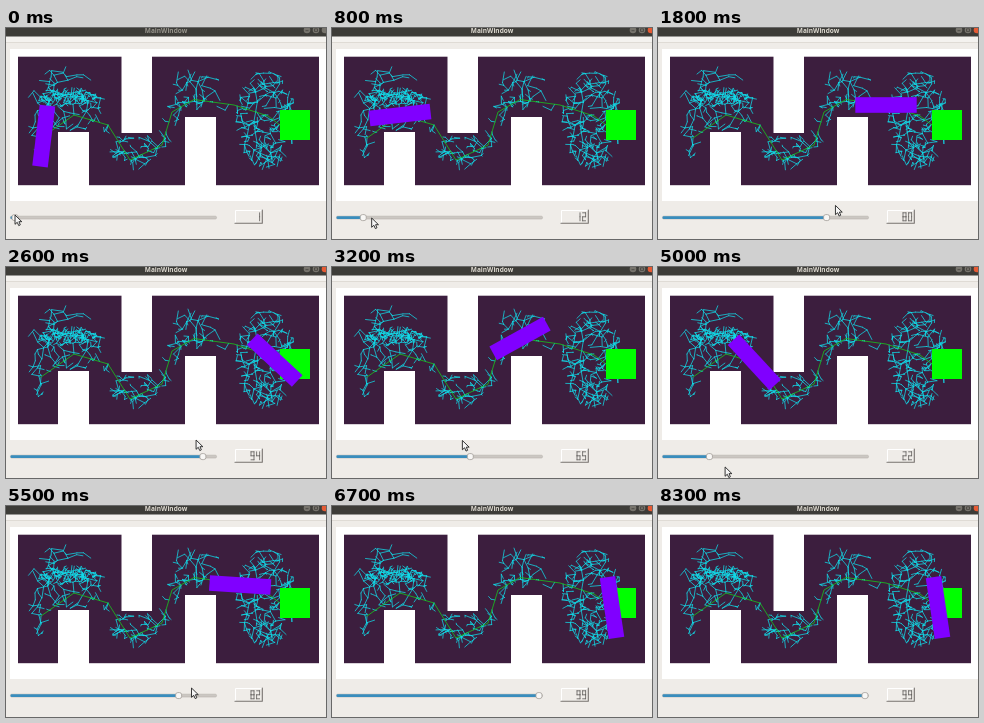
An HTML page that plays this animation: 320 px wide and 211 px high, repeating every 8.5 s.

```html
<!DOCTYPE html>
<html lang="en">
<head>
<meta charset="utf-8">
<title>MainWindow</title>
<style>
html, body { margin: 0; width: 100%; height: 100%; overflow: hidden; background: #efece8; }
svg { display: block; width: 100vw; height: 100vh; }
#title { font: bold 6.5px "Open Sans", sans-serif; text-anchor: middle; }
.line { fill: none; stroke-linecap: round; stroke-linejoin: round; }
</style>
</head>
<body>
<svg viewBox="0 0 320 211">
  <rect width="320" height="211" fill="#efece8"/>
  <rect y="8" width="320" height="6" fill="#f4f2ef"/>
  <path d="M0 14.5H320" stroke="#dfdbd5"/>
  <rect width="320" height="8.5" fill="#3d3c38"/>
  <text id="title" x="160" y="4.6">MainWindow</text>
  <g fill="#77746d">
    <circle cx="301" cy="2" r="3.3"/>
    <circle cx="310" cy="2" r="3.3"/>
    <circle id="close" cx="319" cy="2" r="3.3"/>
    <path d="M299.5 2.7h3M308.5 .8h3v2.6h-3z" fill="none" stroke="#44423d" stroke-width=".8"/>
  </g>

  <rect x="4" y="21" width="316" height="152" fill="#fff"/>
  <rect x="12" y="28.7" width="301" height="128.5" fill="#3c1e3e"/>
  <path id="tree" class="line" stroke="#12dbe8" stroke-width=".75"/>
  <path id="path" class="line" stroke="#18c51c" stroke-width=".8"/>
  <path id="walls" fill="#fff"/>
  <rect x="274" y="82" width="30" height="30" fill="#0f0"/>
  <rect id="robot" x="-30.7" y="-7.8" width="61.4" height="15.6" fill="#8000ff"/>

  <rect x="4.5" y="188.2" width="206" height="2.8" rx="1.2" fill="#cbc7c2" stroke="#b5b1ac" stroke-width=".6"/>
  <rect id="fill" x="4.5" y="188.2" height="2.8" rx="1.2" fill="#398dbd"/>
  <rect id="handle" x="-3" y="186.6" width="6" height="6" rx="2.2" fill="#f8f7f5" stroke="#a29e99" stroke-width=".8"/>

  <rect x="229" y="182" width="27.5" height="13.5" fill="#efece8"/>
  <path d="M229.5 195V182.5H256" class="line" stroke="#fff"/>
  <path d="M229 195.3H256.3V182" class="line" stroke="#77736f" stroke-width="1.1"/>
  <path id="digits" class="line" stroke="#5d5b59" stroke-width=".8"/>

  <path id="cursor" d="M0 0V9.3L2.2 7.3 3.7 10.6 5.3 9.8 3.9 6.7H6.8Z" fill="#f6f6f6" stroke="#222" stroke-width=".9"/>
</svg>
<script>
const $ = id => document.getElementById(id);
const LOOP = 8500, FRAME = 100;
const walls = [[115.5, 28, 30.5, 77], [52, 104, 31, 54], [179, 89, 31, 69]];

// Key poses along the plan: slider value, x, y, angle
const route = [
  [0, 35, 110, -90], [12, 68, 87, -6.5], [24, 102, 97, 58],
  [36, 124, 132, 18], [47, 156, 117, -50], [57, 166, 84, -64],
  [65, 188, 71.5, -29], [80, 228, 77, 0], [91, 262, 88, 20], [99, 280, 101.5, 81.5]
];

const ramp = (t, from, to) => Math.min(1, Math.max(0, (t - from) / (to - from)));
const ease = (t, from, to) => {
  const k = ramp(t, from, to);
  return k * k * (3 - 2 * k);
};

// The slider is dragged to the end, back to the start and to the end again.
const valueAt = t => 1 + 98 * ease(t, 380, 2350) - 99 * ramp(t, 2500, 4510) + 99 * ease(t, 4650, 5805);
const knobAt = value => 7 + value * 2.02;

// The pointer runs a little ahead of the knob and drifts off the groove.
const pointerAt = t => [
  knobAt(valueAt(t + 70)),
  190 - 3 * ease(200 - t, 0, 200) - 17 * ease(t, 800, 2300) + 42 * ease(t, 3150, 3950) -
    33 * ease(t, 4600, 5450) + 33 * ease(t, 6300, 6800)
];

function poseAt(value) {
  const i = Math.max(1, route.findIndex(key => key[0] >= value));
  const a = route[i - 1], b = route[i], k = ramp(value, a[0], b[0]);
  return [1, 2, 3].map(n => a[n] + (b[n] - a[n]) * k);
}

function seeded(seed) {
  return () => (seed = seed * 16807 % 2147483647) / 2147483647;
}

const blocked = (x, y) => x < 14 || x > 311 || y < 31 || y > 155 ||
  walls.some(([l, t, w, h]) => x > l - 1 && x < l + w + 1 && y > t - 1 && y < t + h + 1);

// Random tree over position and heading, so its flat view crosses itself.
function growTree() {
  const random = seeded(4177), nodes = [], TURN = 0.25, STEP = 11;
  for (let v = 0; v <= 99; v += 3) {
    const [x, y, angle] = poseAt(v);
    nodes.push([x, y, angle * TURN]);
  }
  let d = "";

  function scatter(count, cx, cy, rx, ry) {
    while (count--) {
      const turn = random() * Math.PI * 2, reach = Math.sqrt(random());
      const aim = [cx + Math.cos(turn) * rx * reach, cy + Math.sin(turn) * ry * reach, (random() - 0.5) * 180 * TURN];
      const gap = node => Math.hypot(...node.map((v, n) => aim[n] - v));
      const near = nodes.reduce((a, b) => gap(b) < gap(a) ? b : a);
      const k = Math.min(1, STEP / gap(near));
      const end = near.map((v, n) => v + (aim[n] - v) * k);
      if (blocked(...end)) continue;
      nodes.push(end);
      const [x1, y1, , x2, y2] = [...near, ...end].map(v => v.toFixed(1));
      d += `M${x1} ${y1}L${x2} ${y2}`;
    }
  }

  scatter(110, 60, 72, 39, 34);
  scatter(190, 62, 69, 29, 10);
  scatter(25, 33, 108, 13, 22);
  scatter(75, 128, 123, 25, 19);
  scatter(50, 189, 60, 27, 23);
  scatter(310, 260, 92, 31, 50);
  for (let i = 0; i < 70; i++) {
    const [x, y] = poseAt(15 + 70 * random());
    scatter(1, x, y, 10, 10);
  }
  return d;
}

// Seven segments: top, upper left, upper right, middle, lower left, lower right, bottom
const segments = ["0 0h3", "0 0v4", "3 0v4", "0 4h3", "0 4v4", "3 4v4", "0 8h3"];
const glyphs = ["012456", "25", "02346", "02356", "1235", "01356", "013456", "025", "0123456", "012356"];

function digitPath(value) {
  return [...String(value).padStart(2)].map((digit, place) =>
    [...(glyphs[digit.trim() || -1] || "")].map(s => {
      const [x, y, stroke] = segments[s].split(/ |(?=[hv])/);
      return `M${+x + 245 + place * 5.6} ${+y + 184.8}${stroke}`;
    }).join("")).join("");
}

function draw(t) {
  const value = Math.round(valueAt(t));
  const [x, y, angle] = poseAt(value);
  const knob = knobAt(value), active = t > 0;

  $("robot").setAttribute("transform", `translate(${x} ${y}) rotate(${angle})`);
  $("handle").setAttribute("transform", `translate(${knob} 0)`);
  $("fill").setAttribute("width", knob - 4.5);
  $("digits").setAttribute("d", digitPath(value));
  $("cursor").setAttribute("transform", `translate(${pointerAt(t)})`);
  $("title").setAttribute("fill", active ? "#dfdbd2" : "#98958d");
  $("close").setAttribute("fill", active ? "#e65b35" : "#77746d");
}

const start = performance.now();
function tick() {
  const t = (performance.now() - start) % LOOP;
  draw(Math.floor(t / FRAME) * FRAME);
  requestAnimationFrame(tick);
}

$("walls").setAttribute("d", walls.map(([x, y, w, h]) => `M${x} ${y}h${w}v${h}h${-w}z`).join(""));
$("tree").setAttribute("d", growTree());
$("path").setAttribute("d", "M" + route.map(([, x, y]) => `${x} ${y}`).join("L"));
tick();
</script>
</body>
</html>
```
